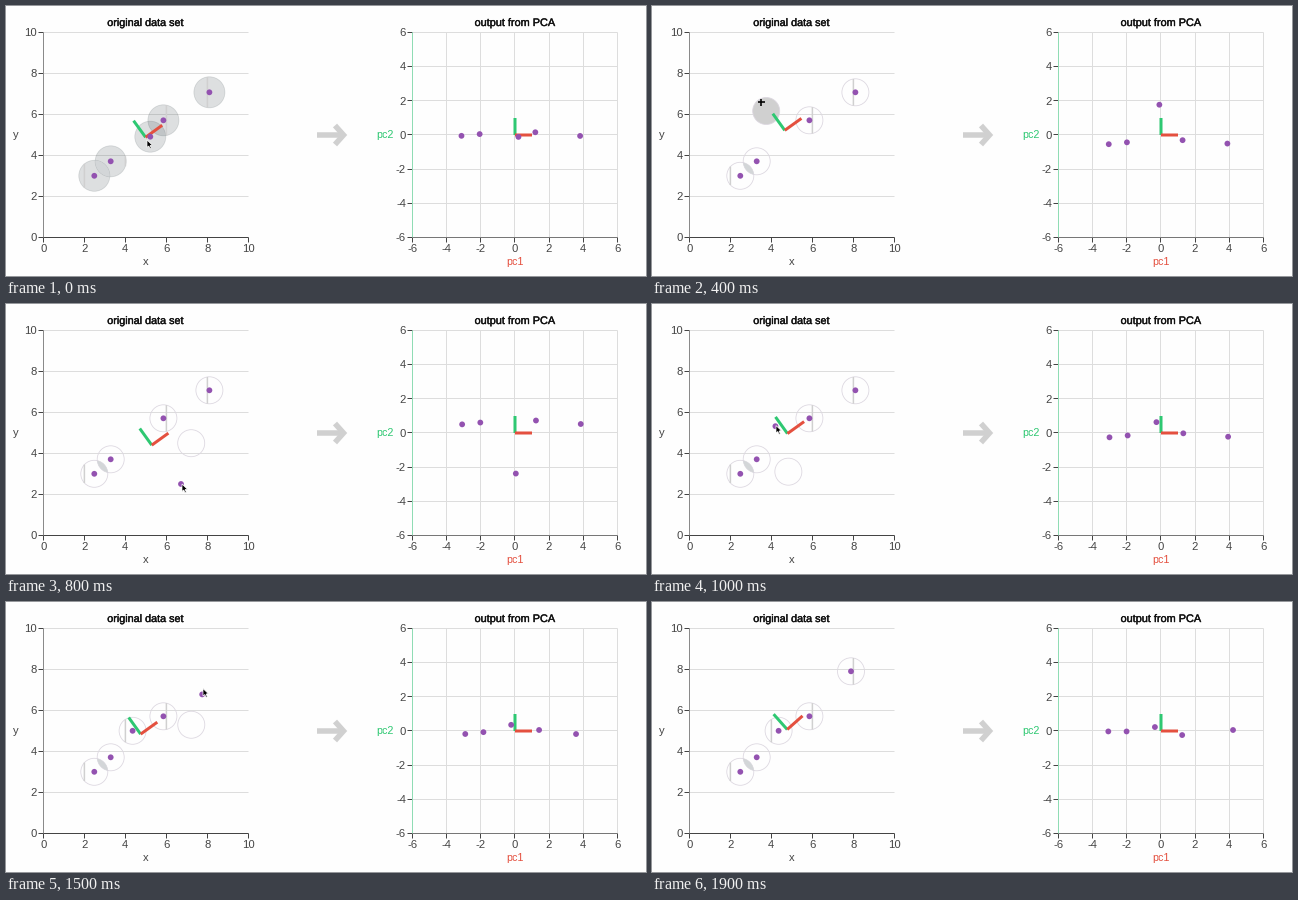
A matplotlib script that plays this animation: 640x270 px, repeating every 2000 ms.

```python
import numpy as np
import matplotlib.pyplot as plt
from matplotlib.animation import FuncAnimation
from matplotlib.patches import Circle, Polygon
from matplotlib.patheffects import withStroke

W, H, DPI = 640, 270, 100
FRAMES, STEP = 20, 100
PX = 72 / DPI

PURPLE, RED, GREEN = "#9352b0", "#e4503f", "#2ec872"
GRID, INK, TEXT, GREY = "#dddddd", "#444444", "#444444", "#d0d0d0"
RING, LENS = "#dcd7e0", "#d3d6d8"
VEIL = (0.2, 0.26, 0.28, 0.16)
UNIT = 20.5          # left plot, pixels per unit
PC_UNIT = 17.1       # right plot
CENTER = np.array([509, 129])

FIXED = [(88.3, 169.8), (104.7, 155.3), (157.4, 114.3)]
D_HOME, D_END = (203.4, 86.3), (199, 69.3)
E_END = (126.6, 128.8)
E_PATH = [(144.3, 130.7), (143, 128), (130, 122), (117, 111), (110, 96),
          (129, 72), (174.3, 70.4), (192, 112), (175, 180), (145, 198),
          (123.4, 122.2), E_END]
D_PATH = [D_HOME, (147.2, 72.4), (178, 143), (196.2, 92.4), (198, 76), D_END]
D_START = 12
FILLED = {1, 2, 3, 4, 11, 12, 13, 17, 18}
POINTER = {0: (141, 134), 6: (180, 72.5), 10: (124, 121.5), 11: (128, 130),
           13: (138, 72.5), 15: (197, 86.5)}

fig = plt.figure(figsize=(W / DPI, H / DPI), dpi=DPI, facecolor="#fefefe")
ax = fig.add_axes([0, 0, 1, 1])
ax.set_xlim(0, W)
ax.set_ylim(H, 0)
ax.axis("off")


def line(xs, ys, color, width=1.0, z=1, **kw):
    kw.setdefault("solid_capstyle", "butt")
    return ax.plot(xs, ys, color=color, lw=width * PX, zorder=z, **kw)[0]


def label(x, y, text, size=11.3, color=TEXT, ha="center", bold=False):
    t = ax.text(x, y, text, fontsize=size * PX, color=color, ha=ha,
                va="baseline", family="Liberation Sans", zorder=3)
    if bold:
        t.set_path_effects([withStroke(linewidth=0.4 * PX, foreground=color)])


def axes_box(left, ticks, x_color, y_color, vertical):
    right, top, bottom = left + 205, 25.95, 230.95
    lo, hi = ticks[0], ticks[-1]
    for v in ticks:
        u = (v - lo) / (hi - lo)
        x = left + u * (right - left)
        y = bottom - u * (bottom - top)
        if v > lo:
            line([left, right], [y, y], GRID)
            if vertical:
                line([x, x], [top, bottom], GRID)
        line([left - 5, left], [y, y], INK, z=2)
        line([x, x], [bottom, bottom + 5], INK, z=2)
        label(left - 6, y + 4.3, str(v), ha="right")
        label(x + 0.3, 245.5, str(v))
    line([left, left], [top, bottom], y_color, z=2.5)
    line([left, right], [bottom, bottom], x_color, z=2.5)


axes_box(36.95, range(0, 11, 2), INK, "#8a8a8a", False)
axes_box(405.95, range(-6, 7, 2), "#777777", "#8fdcb4", True)
label(140, 20, "original data set", 10.8, "#111111", bold=True)
label(509, 20, "output from PCA", 10.9, "#111111", bold=True)
label(139.5, 259, "x")
label(9.5, 132, "y")
label(509.3, 259, "pc1", 10.8, RED)
label(379, 132.5, "pc2", 10.8, GREEN)
line([311, 337], [129, 129], GREY, 5.5)
line([329, 337.5, 329], [119.5, 129, 138.5], GREY, 5.5,
     solid_joinstyle="miter")


def disc(r, z, **kw):
    return ax.add_patch(Circle((0, 0), r, zorder=z, **kw))


halos = [disc(13.5, 4, lw=0.8 * PX) for _ in range(5)]
lens = disc(13.5, 4.1, fc=LENS, ec="none")
chords = line([], [], GREY, 1.5, z=4.2, snap=False)
left_axes = [line([], [], c, 3, z=5) for c in (GREEN, RED)]
line([509, 509], [129, 112], GREEN, 3, z=5, snap=False)
line([509, 526], [129, 129], RED, 3, z=5, snap=False)
dots = [disc(2.9, 6, fc=PURPLE, ec="none") for _ in range(5)]
pc_dots = [disc(2.9, 6, fc=PURPLE, ec="none") for _ in range(5)]

ARROW = np.array([(0, 0), (0, 7.5), (1.8, 6), (3, 8.8), (4.3, 8.2),
                  (3.1, 5.5), (5.4, 5.2)])
arrow = ax.add_patch(Polygon(ARROW, fc="black", ec="white", lw=0.5, zorder=8))
move_cursor = [line([106, 113], [96, 96], "black", 1.6, z=8),
               line([109, 109], [92.5, 99.5], "black", 1.6, z=8)]


def positions(i):
    e = E_PATH[min(i, len(E_PATH) - 1)]
    d = D_PATH[min(max(i - D_START, 0), len(D_PATH) - 1)]
    return np.array(FIXED + [d, e], float)


def components(pts):
    """Mean and the two unit axes, pc1 to the right and pc2 upward."""
    mean = pts.mean(axis=0)
    _, vecs = np.linalg.eigh(np.cov((pts - mean).T))
    a = vecs[:, 1]
    a = a if a[0] > 0 else -a
    return mean, a, np.array([a[1], -a[0]])


def grid_chords(centers, r):
    xs, ys = [], []
    for cx, cy in centers:
        for gx in 37.4 + UNIT * np.arange(2, 10, 2):
            if abs(gx - cx) < r:
                h = np.sqrt(r * r - (gx - cx) ** 2)
                xs += [gx, gx, np.nan]
                ys += [cy - h, cy + h, np.nan]
    return xs, ys


def draw(i):
    pts = positions(i)
    before = positions(max(i - 1, 0))
    trail = 0.6 * before + 0.4 * pts     # halos lag behind the dots
    first = i == 0
    r = 15.5 if first else 13.5
    active = 4 if i < D_START else 3
    for k, h in enumerate(halos):
        solid = k == active and i in FILLED
        h.center = trail[k]
        h.radius = r
        h.set_facecolor(VEIL if first else GREY if solid else "none")
        h.set_edgecolor(VEIL if first else RING)
    lens.center = trail[1]
    lens.radius = r
    lens.set_clip_path(halos[0])
    open_halos = [c for k, c in enumerate(trail)
                  if not (k == active and i in FILLED)]
    chords.set_data(*grid_chords(open_halos, r))

    mean, a, b = components(pts)
    for ln, v in zip(left_axes, (b, a)):
        tip = mean + UNIT * v
        ln.set_data([mean[0], tip[0]], [mean[1], tip[1]])
    for dot, pc, p in zip(dots, pc_dots, pts):
        dot.center = p
        q = (p - mean) / UNIT * PC_UNIT
        pc.center = CENTER + (q @ a, -(q @ b))

    grab = i == 4
    arrow.set_visible(not grab and i < FRAMES - 1)
    arrow.set_xy(ARROW + POINTER.get(i, pts[active] + (1, 0)))
    dots[4].set_visible(not grab)
    for ln in move_cursor:
        ln.set_visible(grab)
    return []


anim = FuncAnimation(fig, draw, frames=FRAMES, init_func=lambda: draw(0),
                     interval=STEP, repeat=True, repeat_delay=0)
plt.show()
```
